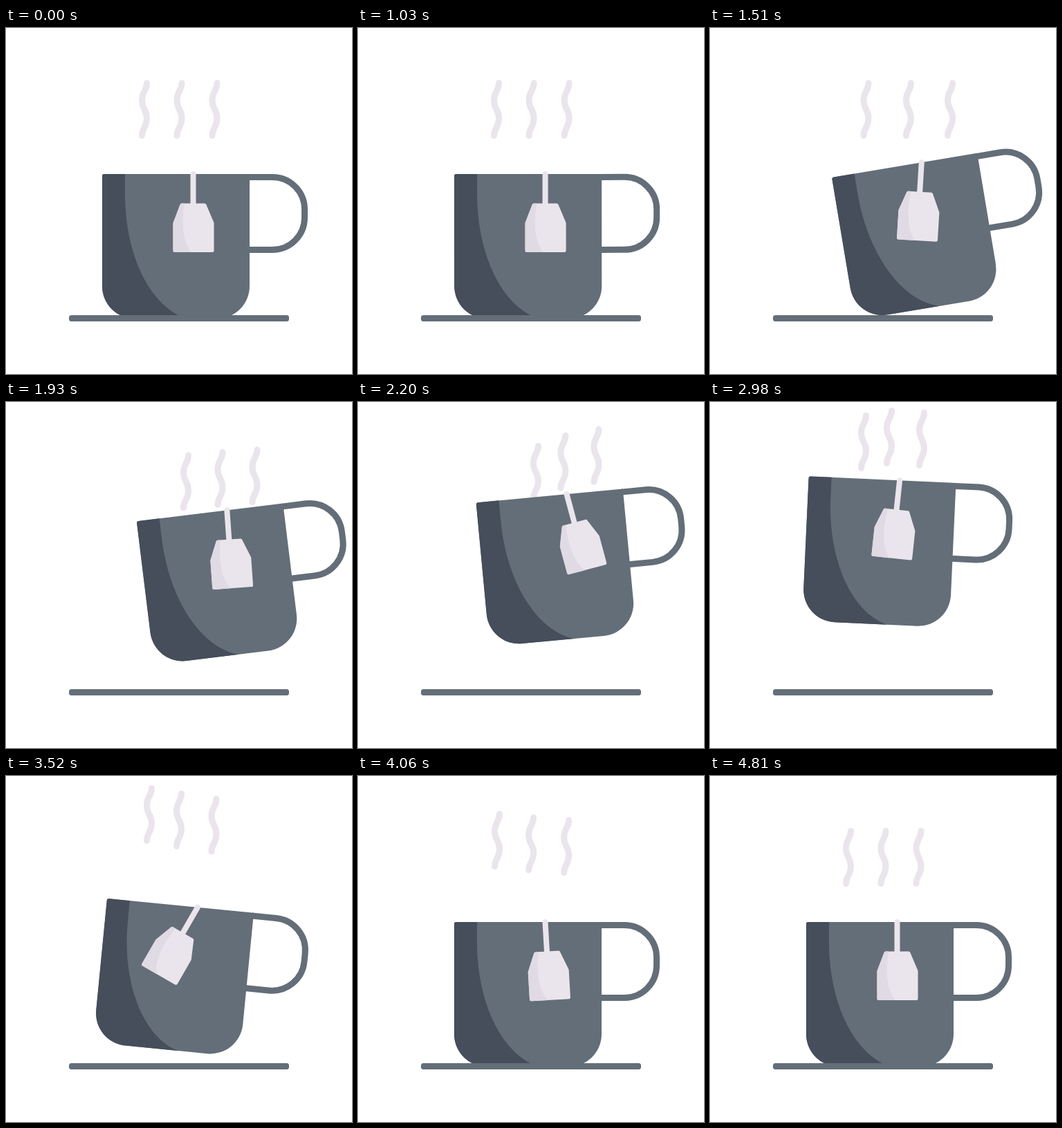
Write an HTML page without scripts that moves like this. It is 500 px wide and 500 px high and loops after 4.84 s.

```html
<!DOCTYPE html>
<html lang="en">
<head>
<meta charset="utf-8">
<title>Tea cup</title>
<style>
  html, body { margin: 0; width: 100%; height: 100%; overflow: hidden; background: #fff; }
  svg { display: block; width: 100%; height: 100%; }
  .body { fill: #646e78; }
  .dark { fill: #454e5a; }
  .handle { fill: none; stroke: #646e78; stroke-width: 9; }
  .paper { fill: #eae5ec; stroke: #eae5ec; stroke-width: 5; stroke-linejoin: round; }
  .shade { fill: #e0dae4; }
  .string { stroke: #eae5ec; stroke-width: 8; stroke-linecap: round; }
  .wisp { fill: none; stroke: #eae5ec; stroke-width: 9; stroke-linecap: round; }

  .cup, .tilt, .tag, .steam g, .wisp { animation: 4840ms linear infinite; }
  .cup { animation-name: travel; }
  .tilt { animation-name: tilt; transform-origin: 245.5px 268px; }
  .tag { animation-name: swing; transform-origin: 270.5px 211px; }
  .steam .left { animation-name: drift-left; }
  .steam .mid { animation-name: drift-mid; }
  .steam .right { animation-name: drift-right; }
  .wisp { animation-name: wave; }

  @keyframes travel {
    0%, 20.8% { translate: 0 0; animation-timing-function: cubic-bezier(.4, 0, .7, .8); }
    31.82% { translate: 47px -14px; }
    35.95% { translate: 61.5px -31px; }
    39.88% { translate: 56px -52px; }
    42.98% { translate: 44px -64px; }
    51.65% { translate: 18px -105px; }
    55.79% { translate: 8px -109px; }
    61.57% { translate: 1px -99px; }
    65.29% { translate: 0 -82px; }
    72.73% { translate: 1px -24px; }
    76.45% { translate: 0 -5px; animation-timing-function: ease-out; }
    78.7%, 100% { translate: 0 0; }
  }

  @keyframes tilt {
    0%, 20.8% { rotate: 0deg; animation-timing-function: ease-in-out; }
    31.4% { rotate: -9.5deg; }
    39.88% { rotate: -7deg; }
    51.65% { rotate: -3.6deg; }
    61.57% { rotate: 2.6deg; }
    65.29% { rotate: 7.1deg; animation-timing-function: ease-out; }
    67.77% { rotate: 8.3deg; animation-timing-function: ease-in; }
    72.73% { rotate: 5.6deg; }
    76.45% { rotate: 1.6deg; animation-timing-function: ease-out; }
    79%, 100% { rotate: 0deg; }
  }

  /* relative to the cup */
  @keyframes swing {
    0%, 20.8% { rotate: 0deg; animation-timing-function: ease-in-out; }
    31% { rotate: 13deg; animation-timing-function: ease-in; }
    39.88% { rotate: 3deg; animation-timing-function: ease-out; }
    51% { rotate: -15.3deg; animation-timing-function: ease-in; }
    61.57% { rotate: 3.4deg; animation-timing-function: ease-out; }
    72.73% { rotate: 24.4deg; animation-timing-function: ease-in-out; }
    81% { rotate: -8deg; animation-timing-function: ease-in-out; }
    88% { rotate: 5deg; animation-timing-function: ease-in-out; }
    94% { rotate: -2deg; animation-timing-function: ease-in-out; }
    99%, 100% { rotate: 0deg; }
  }

  @keyframes drift-left {
    0%, 20.8% { translate: 0 0; animation-timing-function: ease-in; }
    31.82% { translate: 28px 0; }
    35.95% { translate: 50px -1px; }
    39.88% { translate: 60px -2.5px; }
    45.45% { translate: 57px -16px; }
    51.65% { translate: 39px -41px; }
    61.57% { translate: 22px -60px; }
    67% { translate: 13px -65px; }
    72.73% { translate: 7px -62px; }
    76.86% { translate: 3px -51px; }
    87.6% { translate: 0 -11px; animation-timing-function: ease-out; }
    96%, 100% { translate: 0 0; }
  }

  @keyframes drift-mid {
    0%, 20.8% { translate: 0 0; animation-timing-function: ease-in; }
    31.82% { translate: 40px 0; }
    35.95% { translate: 57px -2px; }
    39.88% { translate: 59px -7px; }
    45.45% { translate: 46px -31px; }
    51.65% { translate: 26px -57px; }
    56.5% { translate: 15px -67px; }
    61.57% { translate: 8.5px -67px; }
    72.73% { translate: -.5px -54px; }
    76.86% { translate: -1px -43px; }
    87.6% { translate: 0 -7px; animation-timing-function: ease-out; }
    95%, 100% { translate: 0 0; }
  }

  @keyframes drift-right {
    0%, 20.8% { translate: 0 0; animation-timing-function: ease-in; }
    31.82% { translate: 50px 0; }
    35.95% { translate: 61px -4px; }
    39.88% { translate: 58px -10.5px; }
    45.45% { translate: 43px -40px; }
    51.65% { translate: 21px -60px; }
    56.5% { translate: 11px -66px; }
    61.57% { translate: 4.5px -64px; }
    72.73% { translate: -1px -46.5px; }
    76.86% { translate: -1px -36px; }
    87.6% { translate: 0 -5px; animation-timing-function: ease-out; }
    94%, 100% { translate: 0 0; }
  }

  @keyframes wave {
    0%, 20.8%, 61.57%, 92%, 100% {
      d: path("M3.5 -38C3.5 -27 -3.5 -26 -3.5 -13S3.5 0 3.5 13S-3.5 27 -3.5 38");
      animation-timing-function: ease-in-out;
    }
    37%, 52%, 72.73% {
      d: path("M-3.5 -38C-3.5 -27 3.5 -26 3.5 -13S-3.5 0 -3.5 13S3.5 27 3.5 38");
      animation-timing-function: ease-in-out;
    }
  }
</style>
</head>
<body>
<svg viewBox="0 0 500 500">
  <defs>
    <path id="wisp" class="wisp" d="M3.5 -38C3.5 -27 -3.5 -26 -3.5 -13S3.5 0 3.5 13S-3.5 27 -3.5 38"/>
  </defs>

  <g class="steam">
    <g class="left"><use href="#wisp" x="200" y="117.5"/></g>
    <g class="mid"><use href="#wisp" x="250.5" y="117.5"/></g>
    <g class="right"><use href="#wisp" x="301.5" y="117.5"/></g>
  </g>

  <g class="cup">
    <g class="tilt">
      <path class="handle" d="M350 215.5H385a46.5 46.5 0 0 1 46.5 46.5v12a46.5 46.5 0 0 1 -46.5 46.5H350"/>
      <path class="body" d="M142 211H352V373a47 47 0 0 1 -47 47H186a47 47 0 0 1 -47 -47V214q0 -3 3 -3z"/>
      <path class="dark" d="M142 211H172V240C172 330 210 405 262 420H186a47 47 0 0 1 -47 -47V214q0 -3 3 -3z"/>
      <g class="tag">
        <path class="string" d="M270.5 211V256"/>
        <path class="paper" d="M254 256H287L298 282V321.5H244V282z"/>
        <path class="shade" d="M254 253.5H258C253 285 256 310 268 324H244q-2.5 0 -2.5 -2.5V282L251.5 255.5q.7 -2 2.5 -2z"/>
      </g>
    </g>
  </g>

  <rect class="body" x="91" y="415" width="318" height="9" rx="3.5"/>
</svg>
</body>
</html>
```
